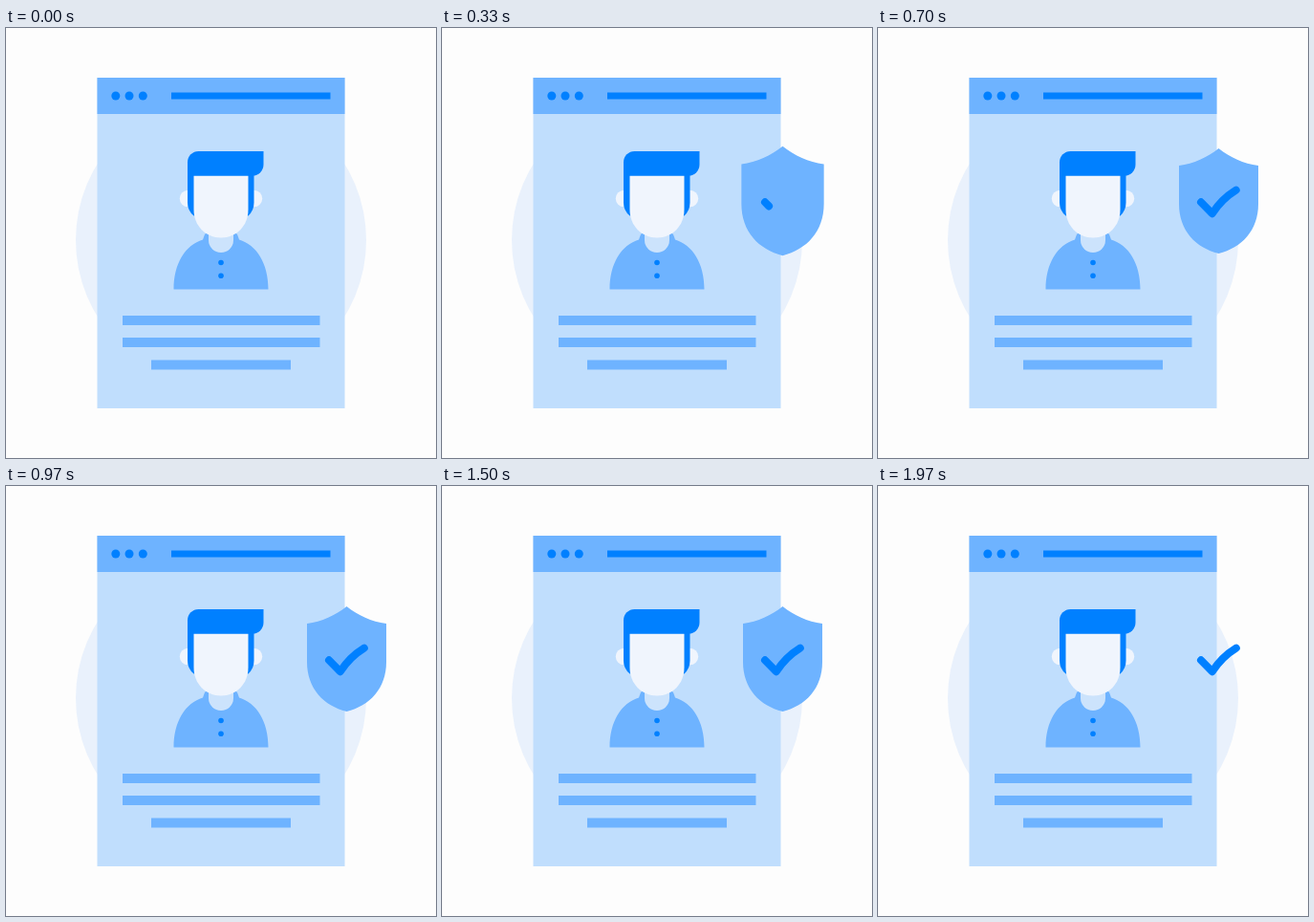
Write an HTML page with a canvas that moves like this. It is 450 px wide and 450 px high and loops after 2 s.

```html
<!DOCTYPE html>
<html lang="en">
<head>
<meta charset="utf-8">
<title>Verified profile</title>
<style>
  html, body { margin: 0; width: 100%; height: 100%; overflow: hidden; background: #fdfdfd; }
  canvas { display: block; width: 450px; height: 450px; }
</style>
</head>
<body>
<canvas id="stage"></canvas>
<script>
const LOOP = 2000;
const BLUE = '#0080ff', MID = '#6eb3ff', PAGE = '#c0defd', HALO = '#e9f1fc', SKIN = '#f0f5fd', NECK = '#cce3fc';

const canvas = document.getElementById('stage');
const ctx = canvas.getContext('2d');
const ratio = window.devicePixelRatio || 1;
canvas.width = canvas.height = 450 * ratio;
ctx.scale(ratio, ratio);

const clamp = v => Math.min(1, Math.max(0, v));
const span = (t, from, to) => clamp((t - from) / (to - from));
const outQuad = p => 1 - (1 - p) ** 2;
const inBack = (p, s) => p * p * ((s + 1) * p - s);
const outBack = (p, s) => 1 - inBack(1 - p, s);

function rect(x1, y1, x2, y2, color) {
  ctx.fillStyle = color;
  ctx.fillRect(x1, y1, x2 - x1, y2 - y1);
}

function disc(x, y, r, color) {
  ctx.fillStyle = color;
  ctx.beginPath();
  ctx.arc(x, y, r, 0, Math.PI * 2);
  ctx.fill();
}

function shape(d, color) {
  ctx.fillStyle = color;
  ctx.fill(new Path2D(d));
}

function drawPage() {
  rect(0, 0, 450, 450, '#fdfdfd');
  disc(225, 222, 152, HALO);
  rect(95.5, 52, 354.5, 398, PAGE);
  rect(95.5, 52, 354.5, 90, MID);
  for (const x of [114.8, 129, 143.3]) disc(x, 71, 4.5, BLUE);
  rect(173, 67.5, 339.5, 74.5, BLUE);
  rect(122, 301, 328.5, 311, MID);
  rect(122, 324, 328.5, 334, MID);
  rect(152, 347.5, 298, 357.5, MID);
}

function drawPerson() {
  shape('M175.5 273.5 C175.5 246 188 227 206 221.5 L208 216 Q209 214 212 214.5 H238 Q241 214 242 216 L244 221.5 C262 227 274.5 246 274.5 273.5 Z', MID);
  shape('M212 205 H238 V222 A13 13 0 0 1 212 222 Z', NECK);
  disc(225, 245.5, 2.8, BLUE);
  disc(225, 259.2, 2.8, BLUE);
  disc(190.5, 178.5, 8.7, SKIN);
  disc(259.5, 178.5, 8.7, SKIN);
  shape('M190 140 H259.5 V183 Q259.5 191 253.5 196.5 H196.5 Q190 191 190 183 Z', BLUE);
  shape('M196.5 154.5 H253.5 V190 C253.5 207 241 219.5 225 219.5 C209 219.5 196.5 207 196.5 190 Z', SKIN);
  shape('M190 154.5 V140.5 A11.5 11.5 0 0 1 201.5 129 H269.5 V143 A11.5 11.5 0 0 1 258 154.5 Z', BLUE);
}

function drawShield(size) {
  if (size <= 0) return;
  ctx.save();
  ctx.translate(356.5, 181);
  ctx.scale(size, size);
  shape('M0 -55 C-12 -45.5 -26 -39 -41.5 -37 V3 C-41.5 31 -24 49 0 55 C24 49 41.5 31 41.5 3 V-37 C26 -39 12 -45.5 0 -55 Z', MID);
  ctx.restore();
}

function drawCheck(part) {
  if (part <= 0) return;
  ctx.strokeStyle = BLUE;
  ctx.lineWidth = 8;
  ctx.lineCap = ctx.lineJoin = 'round';
  // 53 slightly exceeds the length of the tick
  ctx.setLineDash([53 * part, 100]);
  ctx.stroke(new Path2D('M338 182.3 L349.8 194.2 Q359.5 179 374.8 169.6'));
  ctx.setLineDash([]);
}

function draw(t) {
  drawPage();
  drawPerson();
  drawShield(t < 1000
    ? outBack(span(t, 18, 400), 1.7)
    : 1 - inBack(span(t, 1730, 1968), 0.8));
  drawCheck(outQuad(span(t, 305, 767)));
}

const start = performance.now();
function tick() {
  draw((performance.now() - start) % LOOP);
  requestAnimationFrame(tick);
}
tick();
</script>
</body>
</html>
```
